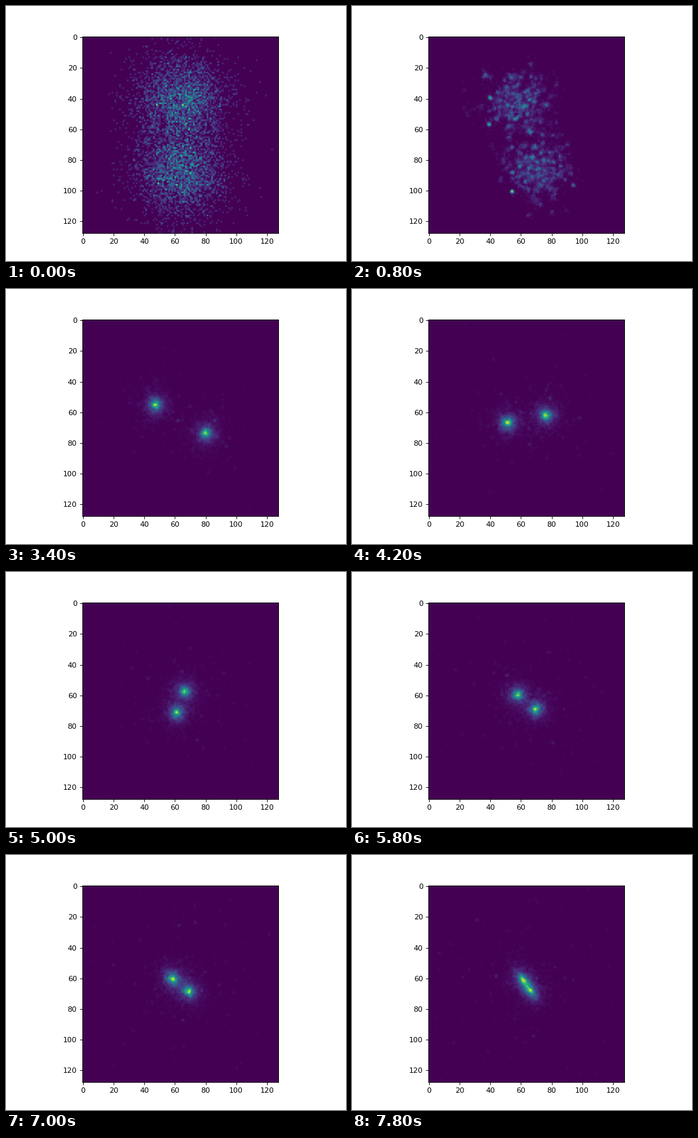
Animation of 512x384 px, one loop 8000 ms. Source, as a matplotlib script:

```python
import numpy as np
import matplotlib.pyplot as plt
from matplotlib.animation import FuncAnimation

SIZE = 128
FRAMES = 40
STEP = 0.2          # seconds per frame
CLUMPED = 0.8       # small clumps have formed
SETTLED = 2.2       # two dense cores have formed
MIDDLE = np.array([63.5, 64.3])

# Orbit of the two cores: half separation and angle (0 = top, turning left)
KEY_T = np.array([0, 0.8, 2.2, 3.4, 5.0, 6.4, 7.8])
KEY_R = np.array([23.7, 22.5, 23.6, 18.8, 7.4, 7.9, 4.0])
KEY_A = np.radians([0, 17, 36, 61, 160, 305, 575])


def hermite(t, xs, ys):
    """Smooth curve through the key points."""
    m = np.gradient(ys, xs)
    i = int(np.clip(np.searchsorted(xs, t) - 1, 0, len(xs) - 2))
    h = xs[i + 1] - xs[i]
    u = (t - xs[i]) / h
    return ((1 + 2 * u) * (1 - u) ** 2 * ys[i] + u * (1 - u) ** 2 * h * m[i]
            + u * u * (3 - 2 * u) * ys[i + 1] + u * u * (u - 1) * h * m[i + 1])


def smooth(t, a, b):
    u = np.clip((t - a) / (b - a), 0, 1)
    return u * u * (3 - 2 * u)


def polar(r, a):
    return np.stack([r * np.cos(a), r * np.sin(a)], axis=1)


def core_offset(t):
    r, a = hermite(t, KEY_T, KEY_R), hermite(t, KEY_T, KEY_A)
    return -r * np.array([np.sin(a), np.cos(a)])


class Galaxy:
    def __init__(self, side, seed, n=3000, clumps=170, groups=80):
        rng = np.random.default_rng(seed)
        self.side = side
        self.home = MIDDLE + side * core_offset(0)

        # Start on whole grid cells
        self.start = np.rint(self.home + rng.normal(0, 15, (n, 2))) - self.home

        # Each particle first falls to the most attractive nearby clump
        seeds = rng.normal(0, 14.5, (clumps, 2))
        pull = rng.lognormal(0, 0.25, clumps)
        dist = np.linalg.norm(self.start[:, None] - seeds, axis=2) / pull
        pick = dist.argmin(axis=1)
        spread = rng.uniform(0.5, 1.4, clumps)[pick]
        spread[rng.random(n) < 0.2] = 3
        self.clump = 0.74 * seeds[pick] + rng.normal(0, 1, (n, 2)) * spread[:, None]

        # Later orbits: dense core, soft halo and far debris in small groups
        kind = rng.random(n)
        self.halo = (kind > 0.68) & (kind <= 0.90)
        self.debris = kind > 0.90
        self.radius = rng.gamma(2, 2.2, n)
        self.radius[self.halo] = rng.gamma(2, 4.2, self.halo.sum())
        self.r0 = np.hypot(*self.clump.T)
        self.a0 = np.arctan2(self.clump[:, 1], self.clump[:, 0])
        self.scatter = rng.normal(0, 0.6, n)
        self.spin = rng.normal(-1.6, 1.6, n) / (1 + self.radius / 4)

        member = (groups * rng.random(n) ** 1.6).astype(int)
        self.group_r = (6 + rng.exponential(9, groups))[member]
        self.group_a = rng.uniform(0, 2 * np.pi, groups)[member]
        self.group_v = rng.exponential(5.5, groups)[member]
        self.group_w = rng.normal(-0.2, 0.25, groups)[member]
        self.jitter = rng.normal(0, 0.55, (n, 2))

    def positions(self, t):
        if t <= CLUMPED:
            s = (t / CLUMPED) ** 1.5
            local = (1 - s) * self.start + s * self.clump
        else:
            local = self.orbits(t)
        return MIDDLE + self.side * core_offset(t) + local

    def orbits(self, t):
        s = smooth(t, CLUMPED, SETTLED)
        r = (1 - s) * self.r0 + s * self.radius
        a = self.a0 + s * self.scatter + self.spin * s * (t - CLUMPED)
        pos = polar(r, a)

        # The halo is drawn out vertically while the cores are far apart
        tide = s * (1 - smooth(t, 2.2, 4.2))
        pos[self.halo] *= [1 - 0.25 * tide, 1 + 0.5 * tide]

        far = self.group_r + self.group_v * max(0, t - 2.4)
        drift = polar(far, self.group_a + self.group_w * t) + self.jitter
        d = self.debris
        pos[d] = (1 - s) * self.clump[d] + s * drift[d]

        # The merging cores stretch into one bar
        bar = smooth(t, 6.6, 7.8)
        axis = core_offset(t)
        axis = axis / np.hypot(*axis)
        along = (pos @ axis)[:, None] * axis
        bound = ~(d | self.halo)
        pos[bound] = ((1 - 0.28 * bar) * (pos - along)
                      + (1 + 0.45 * bar) * along)[bound]
        return pos


def deposit(pos):
    """Share every particle among its four nearest cells."""
    base = np.floor(pos).astype(int)
    frac = pos - base
    grid = np.zeros(SIZE * SIZE)
    for dx in (0, 1):
        for dy in (0, 1):
            wx = frac[:, 0] if dx else 1 - frac[:, 0]
            wy = frac[:, 1] if dy else 1 - frac[:, 1]
            cell = ((base[:, 1] + dy) % SIZE) * SIZE + (base[:, 0] + dx) % SIZE
            grid += np.bincount(cell, wx * wy, SIZE * SIZE)
    return grid.reshape(SIZE, SIZE)


galaxies = [Galaxy(1, 11), Galaxy(-1, 29)]


def density(i):
    t = i * STEP
    return deposit(np.concatenate([g.positions(t) for g in galaxies]))


fig, ax = plt.subplots(figsize=(6.4, 4.8), dpi=80)
image = ax.imshow(density(0), cmap="viridis")


def update(i):
    rho = density(i)
    image.set_data(rho)
    image.set_clim(0, rho.max())
    return [image]


anim = FuncAnimation(fig, update, frames=FRAMES, interval=1000 * STEP,
                     repeat=True, repeat_delay=0)
plt.show()
```
